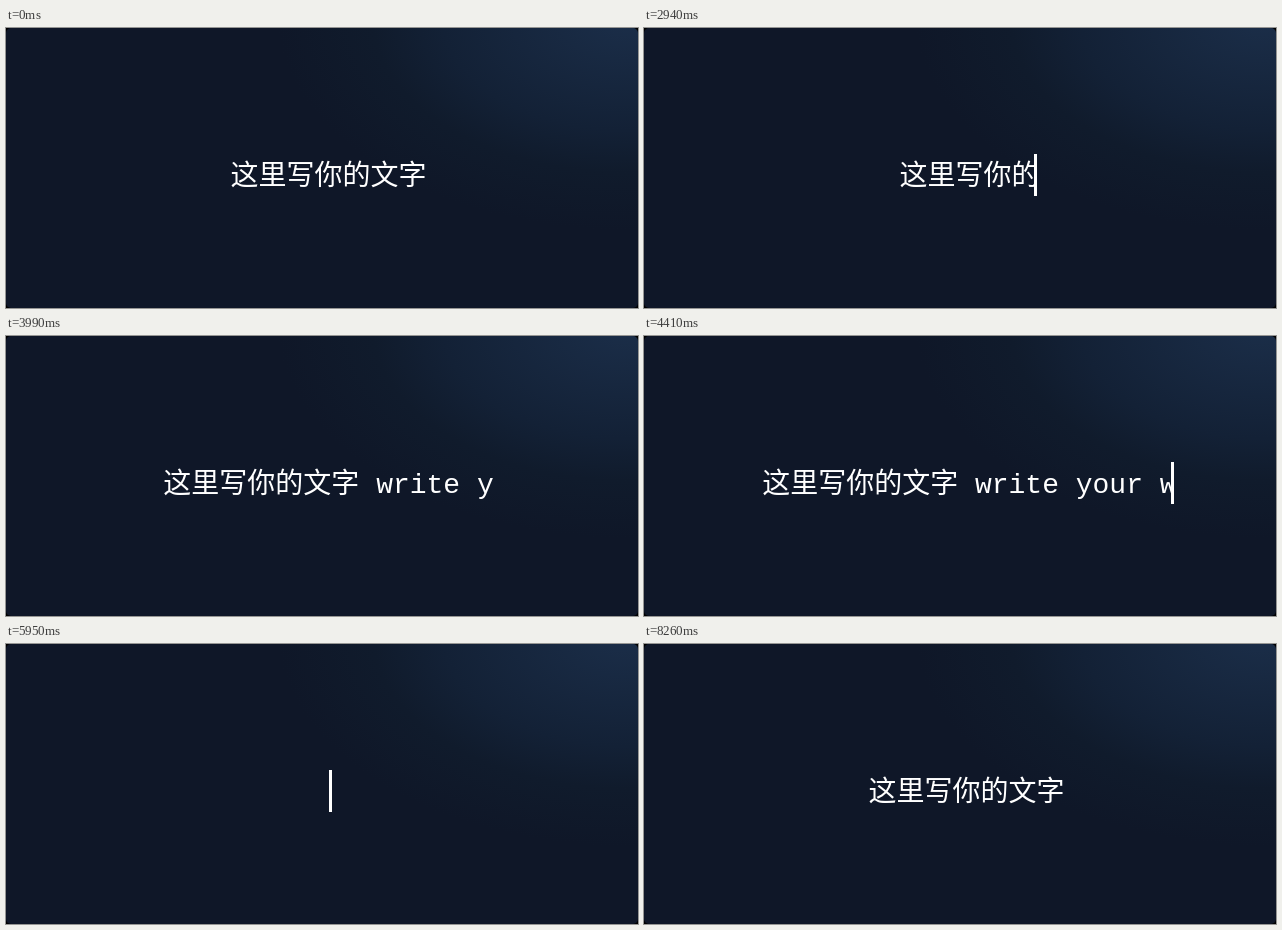
Recreate the animation shown at these times as an HTML page. Size 632 px wide and 280 px high, loop 8330 ms.

```html
<!DOCTYPE html>
<html lang="zh-CN">
<head>
<meta charset="utf-8">
<title>Typewriter</title>
<style>
html, body { margin: 0; width: 100%; height: 100%; overflow: hidden; }
html { background: #000; }
body {
  position: relative;
  border-radius: 5px;
  background: radial-gradient(ellipse 350px 212px at 622px -10px, #1b2e49, #132136 53%, #101b2c 73%, #0f1728 100%) #0f1728;
}
#line {
  position: absolute;
  top: 126px;
  height: 42px;
  box-sizing: border-box;
  overflow: hidden;
  border-right: 3px solid #fff;
  color: #fff;
  font: 28px/47px "Courier New", "Liberation Mono", "Noto Sans CJK SC", "Noto Sans CJK", monospace;
  white-space: pre;
}
</style>
</head>
<body>
<div id="line"></div>
<script>
const LOOP = 8330, TICK = 70, STEP = 105, BLINK = 1055, CENTER = 324, CARET = 3;
const SHORT = "这里写你的文字", LONG = SHORT + " write your words here";
// blink: time after the start at which the caret first hides
const runs = [
  { start: 0, text: SHORT, blink: 180 },
  { start: 2130, text: LONG, blink: 280 },
  { start: 5945, text: SHORT, blink: 180 },
];
const line = document.getElementById("line");

const textWidth = text => [...text].reduce((sum, c) => sum + (c > "\u2fff" ? 28 : 16.8), 0);

function draw(now) {
  const t = Math.floor(now % LOOP / TICK) * TICK;
  const run = runs.findLast(r => r.start <= t);
  const time = t - run.start;
  const opening = t < 2 * TICK; // the finished line lingers as the loop restarts
  const count = run.text.length;
  const typed = opening ? count : Math.min(count, Math.floor(time / STEP));
  const hidden = opening || (time >= run.blink && (time - run.blink) % BLINK < BLINK / 2);
  const width = Math.max(CARET, (textWidth(run.text) + CARET) * typed / count);

  line.textContent = run.text;
  line.style.width = width + "px";
  line.style.left = CENTER - width / 2 + "px";
  line.style.borderColor = hidden ? "transparent" : "#fff";
}

const begin = performance.now();
function frame() {
  draw(performance.now() - begin);
  requestAnimationFrame(frame);
}
frame();
</script>
</body>
</html>
```
